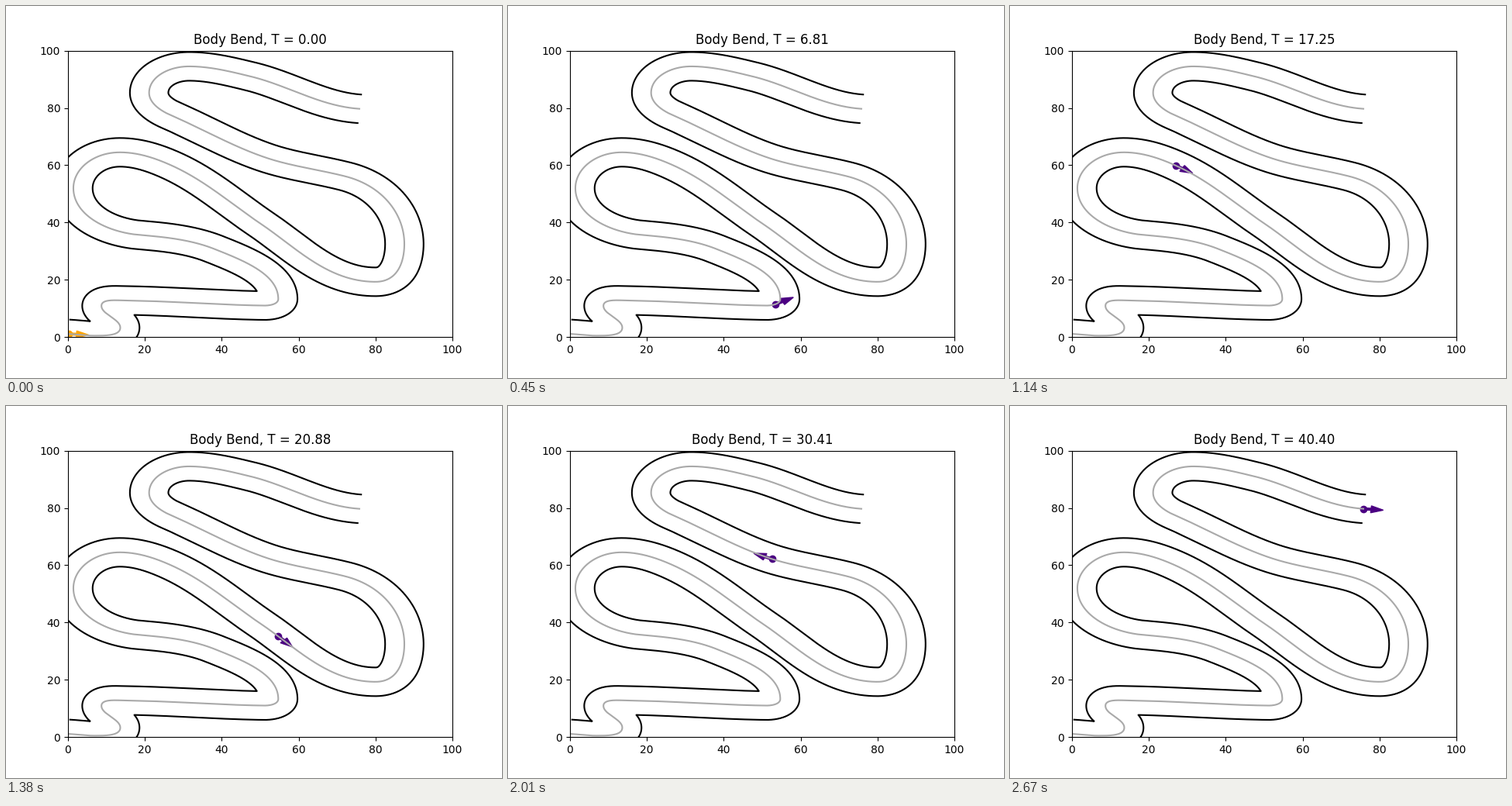
Animation, 640 px wide and 480 px high, one loop 2700 ms. Source, as a matplotlib script:

```python
import numpy as np
import matplotlib.pyplot as plt
from matplotlib.animation import FuncAnimation

FRAMES = 90
INTERVAL = 30
END_TIME = 40.40
HALF_WIDTH = 5.0

# Key points of the centre line: x, y, direction in degrees.
KEYS = [
    (0.2, 1.1, -4), (6.7, 0.5, 0), (13.6, 3.3, 90), (8.7, 10.9, 90),
    (14.5, 12.8, -1), (51, 11, -1), (54.7, 13.3, 90), (38, 30.8, 152),
    (19, 35.6, 174), (1.4, 52, 90), (13.5, 64.5, 0), (26.8, 60, -31),
    (50.2, 39.5, -42), (80, 19.3, 0), (87.5, 32.5, 90), (72.2, 56.1, 161),
    (51.8, 62.5, 156), (27, 77.3, 150), (21.1, 85.3, 90), (31.5, 94.5, 0),
    (47.5, 91, -18), (75.8, 79.7, -5),
]


def bend(start, end, samples=200):
    """Cubic Bezier between two key points, close to a circular arc."""
    p, q = np.array(start[:2]), np.array(end[:2])
    a, b = np.radians(start[2]), np.radians(end[2])
    handle = np.hypot(*(q - p)) / (3 * np.cos((b - a) / 4) ** 2)
    c = p + handle * np.array([np.cos(a), np.sin(a)])
    d = q - handle * np.array([np.cos(b), np.sin(b)])
    t = np.linspace(0, 1, samples, endpoint=False)[:, None]
    u = 1 - t
    return u**3 * p + 3 * u**2 * t * c + 3 * u * t**2 * d + t**3 * q


def wall(side):
    """Offset curve with the loops inside tight bends trimmed away."""
    edge = path + side * HALF_WIDTH * normal
    keep = [np.min(np.sum((path - e) ** 2, axis=1)) > (HALF_WIDTH - 0.02) ** 2
            for e in edge]
    return edge[keep]


path = np.vstack([bend(a, b) for a, b in zip(KEYS, KEYS[1:])]
                 + [KEYS[-1][:2]])
arc = np.concatenate([[0], np.cumsum(np.hypot(*np.diff(path, axis=0).T))])
slope = np.gradient(path, arc, axis=0)
slope /= np.hypot(*slope.T)[:, None]
normal = np.column_stack([-slope[:, 1], slope[:, 0]])

fig, ax = plt.subplots(figsize=(6.4, 4.8), dpi=100)
ax.plot(*path.T, color="darkgray", lw=1.5)
for side in (1, -1):
    ax.plot(*wall(side).T, color="black", lw=1.5)
dot = ax.scatter([0], [0], s=36)
arrow = ax.arrow(0, 0, 2, 0, width=0.7, head_width=2.4, head_length=3.2)
ax.set_xlim(0, 100)
ax.set_ylim(0, 100)
title = ax.set_title("")


def draw(n):
    progress = n / (FRAMES - 1)
    # The vehicle follows the centre line at constant speed.
    i = min(np.searchsorted(arc, progress * arc[-1]), len(path) - 1)
    x, y = path[i]
    dx, dy = 2 * slope[i]
    color = "orange" if n == 0 else "indigo"
    dot.set_offsets([(x, y)])
    dot.set_color(color)
    arrow.set_data(x=x, y=y, dx=dx, dy=dy)
    arrow.set_color(color)
    title.set_text(f"Body Bend, T = {progress * END_TIME:.2f}")
    return dot, arrow, title


anim = FuncAnimation(fig, draw, frames=FRAMES, interval=INTERVAL,
                     repeat=True, repeat_delay=0, blit=False)
plt.show()
```
